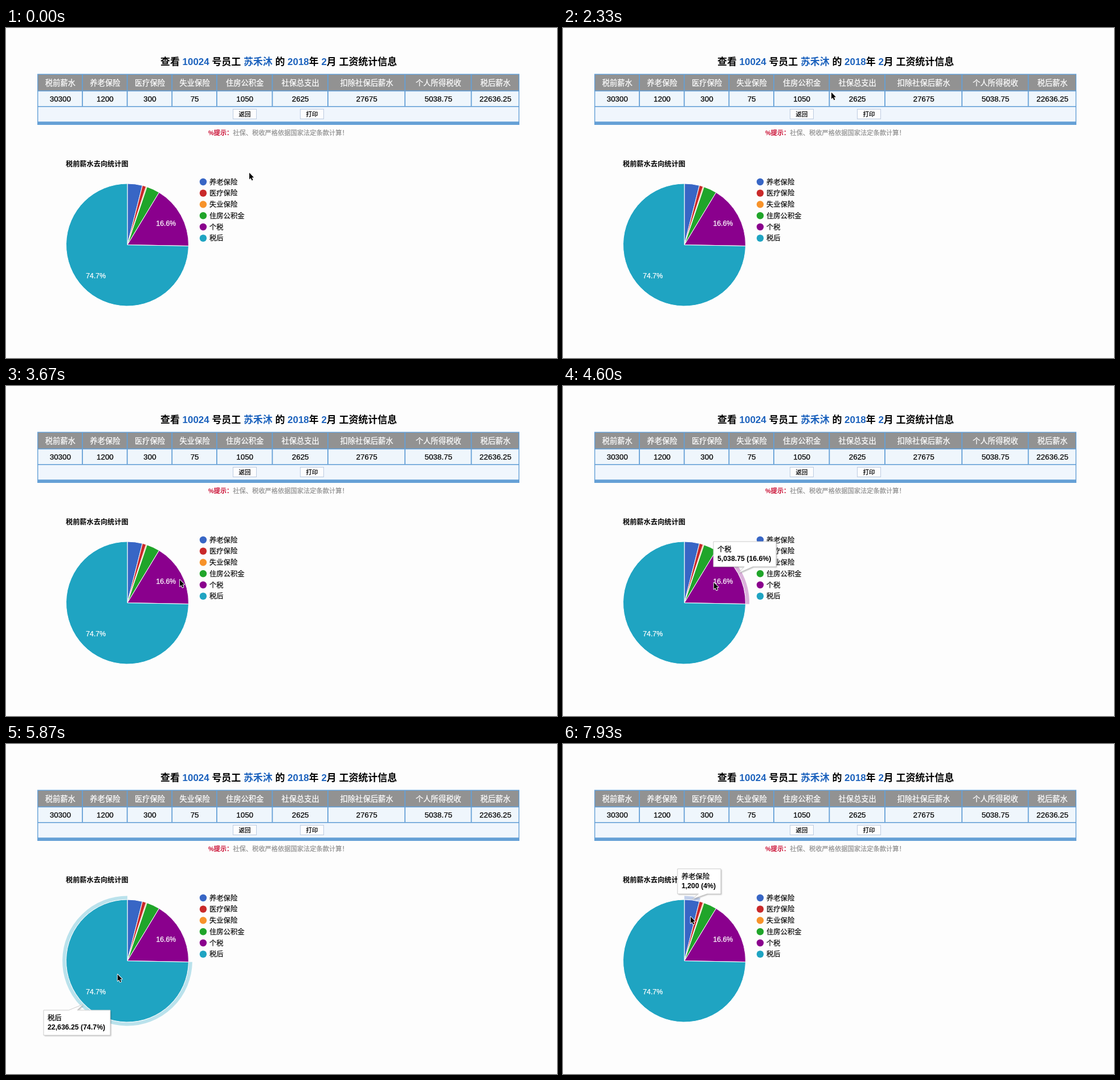
These frames come from a looping animation (967 by 579 pixels, 8 s). An HTML page with a canvas:

```html
<!DOCTYPE html>
<html lang="zh-CN">
<head>
<meta charset="utf-8">
<style>
html, body { margin: 0; width: 100%; height: 100%; overflow: hidden; background: #fdfdfd; }
canvas { display: block; }
</style>
</head>
<body>
<canvas id="stage" width="967" height="579"></canvas>
<script>
const ctx = document.getElementById('stage').getContext('2d');
const LOOP = 8000, STEP = 1000 / 15;
const FONT = '"Liberation Sans", "Noto Sans CJK SC", "Noto Sans CJK", sans-serif';
const BLUE = '#1c62bd', LINE = '#65a0d6';
const PIE = { x: 213, y: 380.5, r: 107.5 };

// "on" is the time at which the pointer selects the slice
const slices = [
  { name: '养老保险', value: 1200, color: '#3866c5', on: 7330 },
  { name: '医疗保险', value: 300, color: '#c9292a' },
  { name: '失业保险', value: 75, color: '#f7932b' },
  { name: '住房公积金', value: 1050, color: '#20a52a' },
  { name: '个税', value: 5038.75, color: '#8a008d', on: 4460 },
  { name: '税后', value: 22636.25, color: '#1fa4c2', on: 5530 }
];
const sum = list => list.reduce((acc, s) => acc + s.value, 0);
const total = sum(slices), social = sum(slices.slice(0, 4));
let turn = -Math.PI / 2;
for (const s of slices) {
  s.from = turn;
  turn += s.value / total * Math.PI * 2;
  s.to = turn;
  s.mid = (s.from + s.to) / 2;
  s.percent = +(s.value / total * 100).toFixed(1) + '%';
}

const heads = [
  '税前薪水', ...slices.slice(0, 4).map(s => s.name),
  '社保总支出', '扣除社保后薪水', '个人所得税收', '税后薪水'
];
const values = slices.map(s => s.value);
const cells = [total, ...values.slice(0, 4), social, total - social, ...values.slice(4)];

// resting and turning points of the pointer: time, x, y
const path = [
  [0, 427, 254], [333, 425, 272], [467, 425, 272], [1400, 191, 128],
  [2133, 550, 110], [2333, 471, 113], [2667, 724, 156], [3667, 305, 340],
  [3867, 350, 342], [4333, 267, 345], [5200, 257, 344], [5533, 246, 396],
  [6133, 160, 410], [6933, 197, 382], [7600, 229, 311], [7933, 224, 303]
];

function text(str, x, y, size, color = '#111', align = 'left', weight = 'normal') {
  ctx.font = `${weight} ${size}px ${FONT}`;
  ctx.fillStyle = ctx.strokeStyle = color;
  ctx.textAlign = align;
  ctx.fillText(str, x, y);
  if (weight === 'normal') {
    ctx.lineWidth = 0.25;
    ctx.strokeText(str, x, y);
  }
  return ctx.measureText(str).width;
}

function rect(x, y, w, h, color) {
  ctx.fillStyle = color;
  ctx.fillRect(x, y, w, h);
}

function onPie(angle, r) {
  return [PIE.x + r * Math.cos(angle), PIE.y + r * Math.sin(angle)];
}

function drawTitle() {
  let x = 271;
  // digits and the name, between the bars, are blue
  '查看 |10024| 号员工 |苏禾沐| 的 |2018|年 |2|月 工资统计信息'.split('|').forEach((part, i) => {
    x += text(part, x, 65, 16.95, i % 2 ? BLUE : '#000', 'left', 'bold');
  });
}

function drawButton(x, label) {
  rect(x, 142, 42, 18, '#bccbe0');
  rect(x + 1, 143, 40, 16, '#fdfdfe');
  text(label, x + 21, 155, 10.4, '#000', 'center');
}

function drawTable() {
  rect(55, 80.5, 846, 89.5, LINE);
  let left = 55.5;
  heads.forEach((head, i) => {
    const right = i < heads.length - 1 ? left + 3 + 18.9 * head.length : 900.5;
    const mid = (left + right) / 2 + 0.5, width = right - left - 1.8;
    rect(left + 0.9, 82, width, 27.5, '#929292');
    rect(left + 0.9, 111.2, width, 25.8, '#eff6fc');
    text(head, mid, 101.3, 13.3, '#fff', 'center');
    text(cells[i], mid, 128.8, 13.4, '#000', 'center');
    left = right;
  });
  rect(56.4, 138.6, 843.2, 25.6, '#f0f6fd');
  drawButton(398, '返回');
  drawButton(516, '打印');

  const w = text('%提示：', 355, 188, 11.1, '#c9092f', 'left', 'bold');
  text('社保、税收严格依据国家法定条款计算！', 355 + w, 188, 11.25, '#929292');
}

function drawPie() {
  text('税前薪水去向统计图', 105, 242.5, 12.2, '#000', 'left', 'bold');
  ctx.lineJoin = 'round';
  slices.forEach((s, i) => {
    ctx.fillStyle = s.color;
    ctx.strokeStyle = '#fff';
    ctx.lineWidth = 1;
    ctx.beginPath();
    ctx.moveTo(PIE.x, PIE.y);
    ctx.arc(PIE.x, PIE.y, PIE.r, s.from, s.to);
    ctx.closePath();
    ctx.fill();
    ctx.stroke();

    const y = 270 + i * 19.75;
    ctx.beginPath();
    ctx.arc(346, y, 6.2, 0, Math.PI * 2);
    ctx.fill();
    text(s.name, 357, y + 4.6, 12.3);
  });
  for (const s of slices.filter(s => s.value / total > 0.1)) {
    const [x, y] = onPie(s.mid, 77.5);
    text(s.percent, x, y + 4.4, 12.3, '#fff', 'center');
  }
}

function drawRing(s) {
  ctx.globalAlpha = 0.3;
  ctx.strokeStyle = s.color;
  ctx.lineWidth = 6;
  ctx.beginPath();
  ctx.arc(PIE.x, PIE.y, PIE.r + 3.5, s.from, s.to);
  ctx.stroke();
  ctx.globalAlpha = 1;
}

function drawTooltip(s) {
  const label = `${s.value.toLocaleString('en-US')} (${s.percent})`;
  ctx.font = `bold 12.3px ${FONT}`;
  const w = Math.round(ctx.measureText(label).width + 16), h = 44;
  const [px, py] = onPie(s.mid, 107), tip = onPie(s.mid, 109);
  const dx = Math.sign(px - PIE.x), dy = Math.sign(py - PIE.y);
  const mid = px + 12.5 * dx, edge = Math.round(py + 11.7 * dy);
  const x = Math.round(mid - w / 2), y = dy < 0 ? edge - h : edge;

  // outline runs from the edge that carries the tail
  const bubble = new Path2D();
  bubble.moveTo(x, edge);
  bubble.lineTo(mid + 6.5 * dx - 7.5, edge);
  bubble.lineTo(...tip);
  bubble.lineTo(mid + 6.5 * dx + 7.5, edge);
  bubble.lineTo(x + w, edge);
  bubble.lineTo(x + w, edge + h * dy);
  bubble.lineTo(x, edge + h * dy);
  bubble.closePath();

  ctx.save();
  ctx.shadowColor = 'rgba(0,0,0,.25)';
  ctx.shadowBlur = 2;
  ctx.shadowOffsetX = ctx.shadowOffsetY = 1.6;
  ctx.fillStyle = '#fff';
  ctx.fill(bubble);
  ctx.restore();
  ctx.strokeStyle = '#ccc';
  ctx.lineWidth = 1;
  ctx.stroke(bubble);
  text(s.name, x + 7, y + 18, 12.3, '#000');
  text(label, x + 7, y + 34.2, 12.3, '#000', 'left', 'bold');
}

function pointerAt(t) {
  const i = path.findIndex(p => p[0] > t);
  if (i < 0) return path[path.length - 1].slice(1);
  const [t0, x0, y0] = path[i - 1], [t1, x1, y1] = path[i];
  const u = (t - t0) / (t1 - t0), k = u * u * (3 - 2 * u);
  return [x0 + (x1 - x0) * k, y0 + (y1 - y0) * k];
}

function drawPointer([x, y]) {
  const arrow = new Path2D('M0 0V11.6L2.6 9.3 4.5 13.6 6.4 12.8 4.5 8.6 8 8.3Z');
  ctx.save();
  ctx.translate(x, y);
  ctx.strokeStyle = '#fff';
  ctx.lineWidth = 1.8;
  ctx.stroke(arrow);
  ctx.fillStyle = '#000';
  ctx.fill(arrow);
  ctx.restore();
}

function draw(now) {
  const t = Math.floor((now % LOOP + 4) / STEP) * STEP % LOOP;
  const [active] = slices.filter(s => s.on <= t).sort((a, b) => b.on - a.on);
  rect(0, 0, 967, 579, '#fdfdfd');
  drawTitle();
  drawTable();
  drawPie();
  if (active) {
    drawRing(active);
    drawTooltip(active);
  }
  drawPointer(pointerAt(t));
}

let start;
function tick(now) {
  start ??= now;
  draw(now - start);
  requestAnimationFrame(tick);
}
draw(0);
requestAnimationFrame(tick);
</script>
</body>
</html>
```
